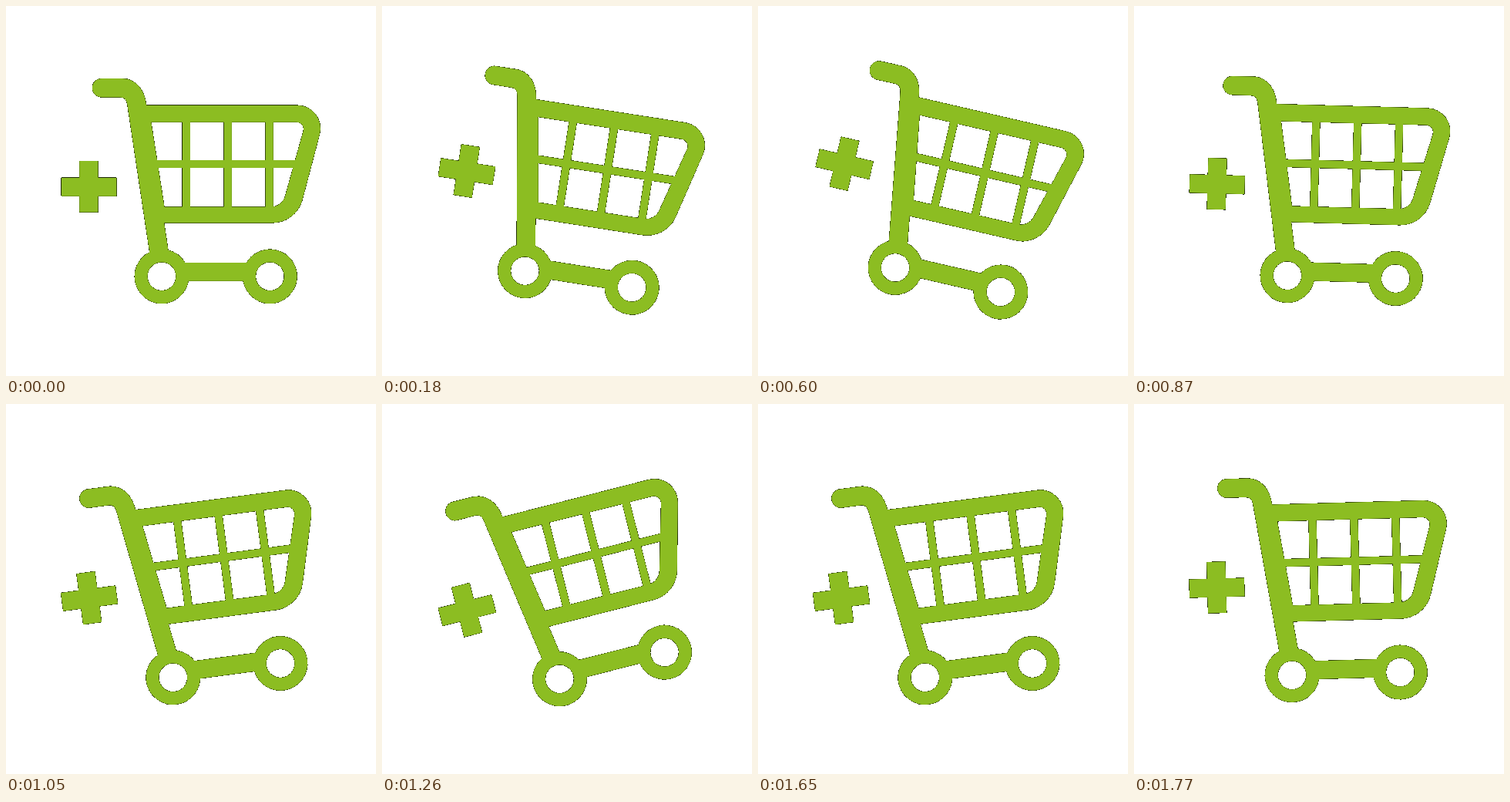
Recreate the animation shown at these times as an HTML page with a canvas. Size 480 px wide and 480 px high, loop 1800 ms.

```html
<!DOCTYPE html>
<html lang="en">
<head>
<meta charset="utf-8">
<title>Add to cart</title>
<style>
  html, body { margin: 0; width: 100%; height: 100%; overflow: hidden; background: #fff; }
  canvas { display: block; width: 480px; height: 480px; }
</style>
</head>
<body>
<canvas id="stage" width="480" height="480"></canvas>
<script>
const SIZE = 480, LOOP = 1800, STEP = 30, SWING = 15;
const GREEN = [140, 189, 34];
const MIN_ALPHA = 50;
const ctx = document.getElementById('stage').getContext('2d', { willReadFrequently: true });

function disc(x, y, r) {
  ctx.beginPath();
  ctx.arc(x, y, r, 0, Math.PI * 2);
  ctx.fill();
}

function cut(draw) {
  ctx.globalCompositeOperation = 'destination-out';
  draw();
  ctx.globalCompositeOperation = 'source-over';
}

// Four-sided shape with rounded right corners
function basket(tl, tr, br, bl, rTop, rBottom) {
  ctx.beginPath();
  ctx.moveTo(...tl);
  ctx.arcTo(...tr, ...br, rTop);
  ctx.arcTo(...br, ...bl, rBottom);
  ctx.lineTo(...bl);
  ctx.closePath();
  ctx.fill();
}

function pole() {
  ctx.beginPath();
  ctx.moveTo(124, 94);
  ctx.lineTo(150.5, 94);
  ctx.bezierCurveTo(167, 94, 180, 107, 182, 128);
  ctx.lineTo(211, 320);
  ctx.lineTo(186.3, 320);
  ctx.lineTo(157.2, 127);
  ctx.quadraticCurveTo(156, 118.4, 148, 118.4);
  ctx.lineTo(124, 118.4);
  ctx.arc(124, 106.2, 12.2, Math.PI / 2, Math.PI * 1.5);
  ctx.fill();
}

function cart() {
  pole();
  basket([180, 128.7], [417, 128.7], [376.6, 281.4], [200, 281.4], 30, 40);
  cut(() => basket([188.4, 150.8], [388.8, 150.8], [358.2, 260.4], [205.5, 260.4], 9, 19));
  for (const x of [228.8, 282.7, 336.6]) ctx.fillRect(x, 148, 10.2, 115);
  ctx.fillRect(188, 199.9, 190, 10.2);

  ctx.fillRect(225, 333, 95, 23.8);
  for (const x of [202, 342.4]) {
    disc(x, 350.8, 35.3);
    cut(() => disc(x, 350.8, 18.4));
  }
}

function plus() {
  ctx.fillRect(95.2, 201, 24.3, 66.6);
  ctx.fillRect(71.8, 222.8, 71.6, 24);
}

// Crisp silhouette whose partly covered edge pixels turn darker
function hardenEdges() {
  const img = ctx.getImageData(0, 0, SIZE, SIZE), px = img.data;
  for (let i = 0; i < px.length; i += 4) {
    const a = px[i + 3];
    for (let c = 0; c < 3; c++) px[i + c] = a < MIN_ALPHA ? 255 : GREEN[c] * a / 255;
    px[i + 3] = 255;
  }
  ctx.putImageData(img, 0, 0);
}

function render(t) {
  const angle = SWING * Math.sin(2 * Math.PI * t / LOOP) * Math.PI / 180;
  ctx.setTransform(1, 0, 0, 1, 0, 0);
  ctx.clearRect(0, 0, SIZE, SIZE);
  ctx.translate(SIZE / 2, SIZE / 2);
  ctx.rotate(angle);
  ctx.translate(-SIZE / 2, -SIZE / 2);
  ctx.fillStyle = `rgb(${GREEN})`;
  cart();
  plus();
  hardenEdges();
}

const start = performance.now();
let shown = -1;

function tick() {
  const t = (performance.now() - start) % LOOP;
  const step = Math.floor(t / STEP);
  if (step !== shown) render((shown = step) * STEP);
  requestAnimationFrame(tick);
}
tick();
</script>
</body>
</html>
```
